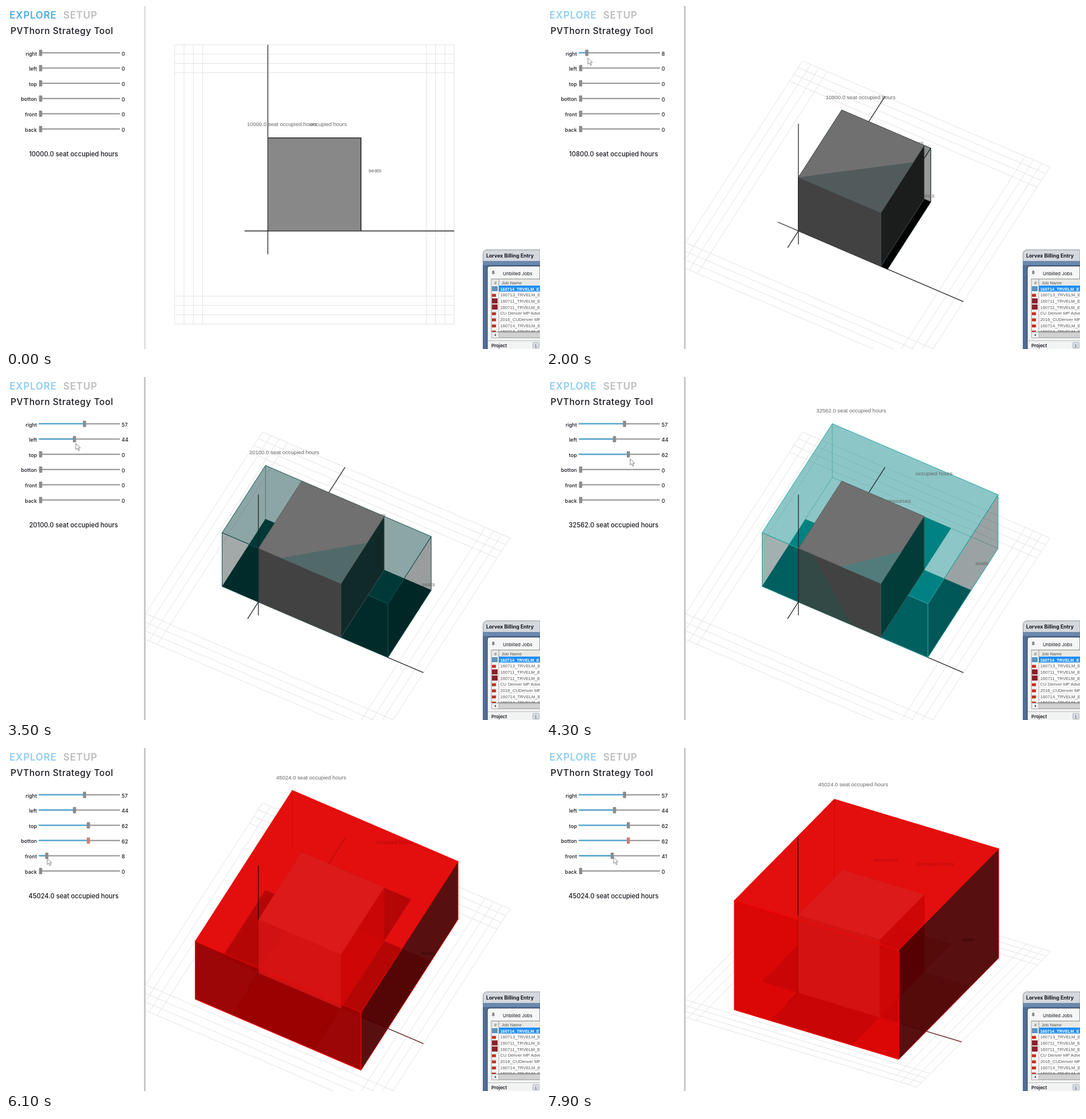
Write an HTML page that moves like this. It is 933 px wide and 600 px high and loops after 8000 ms.

```html
<!DOCTYPE html>
<html lang="en">
<head>
<meta charset="utf-8">
<title>Strategy tool</title>
<style>
html, body { margin: 0; width: 100%; height: 100%; overflow: hidden; background: #fff; }
svg { display: block; width: 933px; height: 600px; }
.ui { font-family: Inter, "Open Sans", sans-serif; font-weight: 500; fill: #17171f; }
.tag { font: 9.5px "Liberation Sans", Arial, sans-serif; text-anchor: middle; }
.list { font: 7.7px "Liberation Sans", Arial, sans-serif; fill: #555; }
</style>
</head>
<body>
<svg viewBox="0 0 933 600">
  <g id="scene"></g>
  <rect width="242" height="600" fill="#fff"/>
  <rect id="divider" x="241" width="3" height="600"/>
  <g class="ui">
    <text id="explore" x="6" y="22" font-size="17" font-weight="600" letter-spacing=".8">EXPLORE</text>
    <text x="100" y="22" font-size="17" font-weight="600" letter-spacing=".7" fill="#bdbdbd">SETUP</text>
    <text x="8" y="49" font-size="15.5" letter-spacing=".55">PVThorn Strategy Tool</text>
    <g id="sliders" font-size="9"></g>
    <text id="total" x="118" y="263" font-size="11.2" text-anchor="middle"></text>
  </g>
  <g id="billing"></g>
  <g id="arrow"><path d="M0 0V11L2.6 8.6L4.6 13L6.4 12.2L4.5 8H8Z" fill="#fff" stroke="#777" stroke-width=".9"/></g>
  <g id="orbit" fill="none" stroke="#111" stroke-width=".9">
    <ellipse rx="8.5" ry="3.5"/><ellipse rx="3.5" ry="8.5"/><path d="M-2 0H2M0 -2V2"/>
  </g>
</svg>
<script>
const LOOP = 8000, SCALE = 162.8;
const el = id => document.getElementById(id);
const rgb = (r, g, b, a = 1) => `rgba(${r | 0},${g | 0},${b | 0},${a})`;

// Linear interpolation through rows of [time, ...values].
function track(rows, t) {
  let i = 0;
  while (i < rows.length - 2 && t >= rows[i + 1][0]) i++;
  const a = rows[i], b = rows[i + 1];
  const k = Math.min(1, Math.max(0, (t - a[0]) / (b[0] - a[0])));
  return a.slice(1).map((v, j) => v + (b[j + 1] - v) * k);
}

// time, turn, tilt, origin x, origin y, top grey, front grey, right grey
const VIEW = [
  [1000, 0, 90, 457.5, 393.5, 136, 30, 20],
  [1300, 25.4, 69.3, 440.5, 367, 120, 32, 20],
  [1700, 27.7, 54.8, 441, 393.5, 112, 66, 28],
  [6300, 27.7, 54.8, 441, 393.5, 112, 66, 28],
  [6800, 29.6, 44.7, 441, 407.7, 112, 66, 28],
  [7200, 28.6, 33.6, 440.3, 427.8, 112, 66, 28]
];
const POINTER = [
  [0, 522, 298], [100, 522, 298], [900, 632, 425], [1000, 632, 425], [1300, 579, 380],
  [1700, 574, 349], [1900, 62, 90], [2600, 140, 96], [2900, 62, 112], [3500, 122, 116],
  [3800, 62, 139], [4300, 147, 143], [4700, 62, 167], [5200, 145, 175], [5600, 62, 192],
  [6200, 74, 193], [6400, 578, 313], [6800, 575, 290], [7200, 576, 268], [7300, 74, 191], [7900, 118, 191]
];
const SLIDERS = [
  ["right", [[1900, 0], [2600, 57]]],
  ["left", [[2900, 0], [3500, 44]]],
  ["top", [[3800, 0], [4300, 62]]],
  ["botton", [[4700, 0], [5200, 62]]],
  ["front", [[5600, 0], [6200, 9], [7300, 9], [7900, 41]]],
  ["back", [[0, 0], [1, 0]]]
];

function drawSliders(values, warm) {
  el("sliders").innerHTML = SLIDERS.map(([name], i) => {
    const y = 82 + i * 26.65, v = values[i], x = 60.5 + v * 1.345;
    const knob = name === "botton" && warm ? "#c9807a" : "#8c8c8c";
    return `<text x="54" y="${y + 4.5}" text-anchor="end">${name}</text>
      <rect x="60" y="${y - 1.2}" width="139" height="2.2" fill="#999"/>
      ${v ? `<rect x="57" y="${y - 1.4}" width="${x - 57}" height="2.4" fill="#55a9d2"/>` : ""}
      <rect x="${x - 2.8}" y="${y - 5.5}" width="5.6" height="11" rx="1" fill="${knob}"/>
      <text x="202" y="${y + 4.7}">${v}</text>`;
  }).join("");
}

function drawScene(t, values, volume) {
  const [right, left, top, bottom, front, back] = values.map(v => v / 100);
  const [turn, tilt, ox, oy, topGrey, frontGrey, rightGrey] = track(VIEW, t);
  const a = turn * Math.PI / 180, p = tilt * Math.PI / 180;
  const c = SCALE * Math.cos(a), s = SCALE * Math.sin(a), up = SCALE * Math.cos(p), flat = Math.sin(p);
  const project = ([x, y, z]) => [ox + x * c + y * s, oy + (x * s - y * c) * flat - z * up];
  const path = pts => pts.map(q => project(q).map(n => n.toFixed(1)).join()).join(" ");
  const poly = (pts, fill, stroke = "none", w = 1) =>
    `<polygon points="${path(pts)}" fill="${fill}" stroke="${stroke}" stroke-width="${w}" stroke-linejoin="round"/>`;
  const line = (from, to, stroke, w = 1) =>
    `<polyline points="${path([from, to])}" fill="none" stroke="${stroke}" stroke-width="${w}"/>`;
  const label = (pos, text, fill) => {
    const [x, y] = project(pos.map(n => n + .15));
    return `<text class="tag" x="${x}" y="${y + 3.3}" fill="${fill}">${text}</text>`;
  };
  const slab = (x0, x1, y0, y1, z) => [[x0, y0, z], [x1, y0, z], [x1, y1, z], [x0, y1, z]];
  const frontWall = (x0, x1, y, z0, z1) => [[x0, y, z0], [x1, y, z0], [x1, y, z1], [x0, y, z1]];
  const rightWall = (x, y0, y1, z0, z1) => [[x, y0, z0], [x, y1, z0], [x, y1, z1], [x, y0, z1]];

  const x0 = -left, x1 = 1 + right, y0 = -bottom, y1 = 1 + top, z0 = -back, z1 = 1 + front;
  const grown = volume > 1, red = volume > 4, g = (volume - 1) * 57;
  const edge = red ? "#f60404" : rgb(g * .25, 12 + g * 1.2, 12 + g * 1.17);
  const ink = red ? "rgba(90,0,0,.32)" : "#666";
  const out = [];

  for (let i = 0; i < 4; i++)
    for (const k of [-1 + i / 10, 2 - i / 10])
      out.push(line([k, -1, 0], [k, 2, 0], "#e2e2e2"), line([-1, k, 0], [2, k, 0], "#e2e2e2"));
  out.push(line([-.25, 0, 0], [2, 0, 0], red && front ? "#581010" : "#222", 1.3));

  // The front wall catches more light as the view tips down.
  const lit = Math.min(1, Math.max(0, (54.8 - tilt) / 21.2));
  const cross = (fill) => [
    [1, x1, 0, 1], [x0, 0, 0, 1], [0, 1, 1, y1], [0, 1, y0, 0]
  ].map(r => poly(slab(...r, z0), fill)).join("");
  const roof = slab(x0, x1, y0, y1, z1);
  const face = frontWall(x0, x1, y0, z0, z1);
  const side = rightWall(x1, y0, y1, z0, z1);

  if (red) {
    out.push(poly(roof, "#e30e0e", edge), poly(face, rgb(157 + 62 * lit, 6, 6), edge));
    out.push(cross(front ? rgb(152, 0, 0, .6 - .35 * lit) : "rgba(190,0,0,.35)"));
    out.push(line([x0, y1, z0], [x0, y1, z1], "rgba(175,0,0,.5)"));
  } else if (grown) {
    out.push(cross(rgb(0, g, g)));
    out.push(poly(slab(x0, x1, y0, y1, z0), "none", rgb(0, g, g, .5), .8));
    out.push(line([x0, y1, z0], [x0, y1, z1], rgb(0, g, g, .5), .8));
    out.push(poly(roof, rgb(0, g, g, .45), edge));
    out.push(poly(face, rgb(0, g * .3, g * .3, .36), edge), poly(side, rgb(0, g * .2, g * .2, .4), edge));
  }

  const midX = (x0 + x1) / 2, midY = (y0 + y1) / 2, midZ = (z0 + z1) / 2;
  out.push(line([0, -.25, 0], [0, 2, 0], red ? "rgba(100,0,0,.4)" : "#222", 1.3));
  if (!red || front > .2) out.push(label([midX, midY, z1], "resources", ink));
  out.push(label([midX, y1, midZ], "occupied hours", ink));
  if (!red) out.push(label([x1, midY, midZ], "seats", ink));

  // Inner cube
  const cubeTop = slab(0, 1, 0, 1, 1), cubeFront = frontWall(0, 1, 0, 0, 1), cubeRight = rightWall(1, 0, 1, 0, 1);
  const rim = red ? "rgba(200,20,20,.4)" : grown ? "#4a5452" : "#151515";
  const grey = v => rgb(v, v, v);
  out.push(poly(cubeFront, red ? "rgba(213,20,20,.92)" : grey(frontGrey), rim, .8));
  out.push(poly(cubeRight, red ? "rgba(204,6,6,.9)" : rgb(rightGrey - Math.min(28, g * .2), rightGrey + g * .25, rightGrey + g * .23), rim, .8));
  if (top && !red) out.push(poly([[0, 0, 0], [.65, 0, 0], [.17, 0, 1], [0, 0, 1]], "#334946"));
  out.push(poly(cubeTop, red && front ? "#dc1a1a" : grey(topGrey), rim, .8));
  if (grown && !front) {
    const [u, v] = track([[2600, 0, .75], [4300, .52, .48], [5200, .6, .28]], t);
    out.push(poly([[u, 0, 1], [1, 0, 1], [1, v, 1]], red ? "#dc1c1c" : rgb(82, 90 + g * .27, 90 + g * .27)));
  }
  if (!grown && tilt > 88) out.push(line([0, 1, 1], [1, 1, 1], "#222", 1.3), line([1, 0, 1], [1, 1, 1], "#222", 1.3));

  if (red) {
    out.push(poly(side, "rgba(78,0,0,.94)", edge));
    out.push(poly(face, "none", edge), label([x1, midY, midZ], "seats", "rgba(25,0,0,.6)"));
    out.push(line([0, 0, 0], [0, 0, 1], "rgba(110,0,0,.35)"), line([0, 0, 1], [0, 0, 2], "#2a0505", 1.3));
  } else {
    out.push(line([0, 0, -.25], [0, 0, 2], "#222", 1.3));
  }
  out.push(label([x0, y1, z1], (volume * 10000).toFixed(1) + " seat occupied hours", red && t > 6300 && t < 7200 ? "#963b3b" : "#666"));
  el("scene").innerHTML = out.join("");
}

function drawBilling() {
  const jobs = ["160714_TRVELM_E", "160713_TRVELM_E", "160711_TRVELM_E", "160711_TRVELM_E",
    "CU Denver MP Adver", "2016_CUDenver MP_", "160714_TRVELM_E", "160714_TRVELM_E"];
  const rows = jobs.map((job, i) => {
    const y = 489 + i * 10.7, chosen = i === 0, dark = i === 2 || i === 3;
    return `${chosen ? `<rect x="861" y="${y}" width="72" height="10.5" fill="#1e8ff5"/>` : ""}
      <rect x="849" y="${y + 1}" width="10" height="9" fill="${chosen ? "#5b94bd" : dark ? "#8b202c" : "#eee"}"/>
      ${chosen || dark ? "" : `<rect x="849" y="${y + 4}" width="7" height="5" fill="#c2301f"/>`}
      <path d="M861 ${y + 10.7}H933" stroke="#bbb" stroke-width=".7" stroke-dasharray="1 1"/>
      <text class="list" x="863.5" y="${y + 8.5}" ${chosen ? 'style="fill:#fff;font-weight:bold;font-size:7.4px"' : ""}>${job}</text>`;
  }).join("");
  el("billing").innerHTML = `
    <path d="M833.5 600V434Q833.5 426.5 841 426.5H933V600Z" fill="#d4d8dd" stroke="#8e959e"/>
    <path d="M833 446H933V600H833Z" fill="#4f6d96"/>
    <path d="M833 446H933V453H833Z" fill="#6b88ad"/>
    <path d="M841 600V460Q841 455 846 455H933V600Z" fill="#f5f6f6" stroke="#28374c"/>
    <text class="ui" x="839" y="440" style="font-size:8.8px;font-weight:700">Lorvex Billing Entry</text>
    <text class="ui" x="849" y="469" style="font-size:7.5px">8</text>
    <text class="ui" x="868" y="471" style="font-size:8px;font-weight:400">Unbilled Jobs</text>
    <rect x="848" y="477.5" width="86" height="92" fill="#fff" stroke="#8c8c8c"/>
    <rect x="848.5" y="478" width="85" height="10.5" fill="#e8e8e5"/>
    <text class="list" x="853" y="487">#</text><text class="list" x="866" y="487">Job Name</text>
    ${rows}
    <path d="M861 478V570" stroke="#888" stroke-width=".8"/>
    <path d="M842 570H933V600H842Z" fill="#f2f3f3"/>
    <rect x="848.5" y="570.5" width="86" height="10" fill="#eee" stroke="#aaa"/>
    <rect x="861" y="571" width="73" height="9" fill="#d2d2d2" stroke="#aaa" stroke-width=".7"/>
    <path d="M856 573.5V577.5L853 575.5Z" fill="#444"/>
    <path d="M842 585.5H933" stroke="#bbb"/>
    <text class="ui" x="848" y="597" style="font-size:8px;font-weight:600">Project</text>
    <rect x="920.5" y="588.5" width="11" height="10" rx="1" fill="#d8dde4" stroke="#b0b8c4"/>
    <text class="list" x="923.5" y="597">1</text>`;
}

function draw(t) {
  const values = SLIDERS.map(([, rows]) => Math.round(track(rows, t)[0]));
  const [right, left, top, bottom] = values;
  const volume = (100 + right + left) * (100 + top + bottom) / 10000;
  drawScene(t, values, volume);
  drawSliders(values, volume > 4);
  el("total").textContent = (volume * 10000).toFixed(1) + " seat occupied hours";

  el("explore").setAttribute("fill", (t >= 1700 && t < 6400) || t >= 7100 ? "#92cdef" : "#4fabdf");
  el("divider").setAttribute("fill", (t >= 1900 && t < 6400) || t >= 7300 ? "#c8c8c8" : "#e1e1e1");
  const [x, y] = track(POINTER, t);
  for (const id of ["arrow", "orbit"]) {
    const shown = t >= 100 && (id === "orbit") === (x > 243);
    el(id).setAttribute("transform", `translate(${x} ${y})`);
    el(id).setAttribute("visibility", shown ? "visible" : "hidden");
  }
}

drawBilling();
let start, shown = -1;
function tick(now) {
  start ??= now;
  const t = Math.floor((now - start) % LOOP / 100) * 100;
  if (t !== shown) draw(shown = t);
  requestAnimationFrame(tick);
}
draw(0);
requestAnimationFrame(tick);
</script>
</body>
</html>
```
